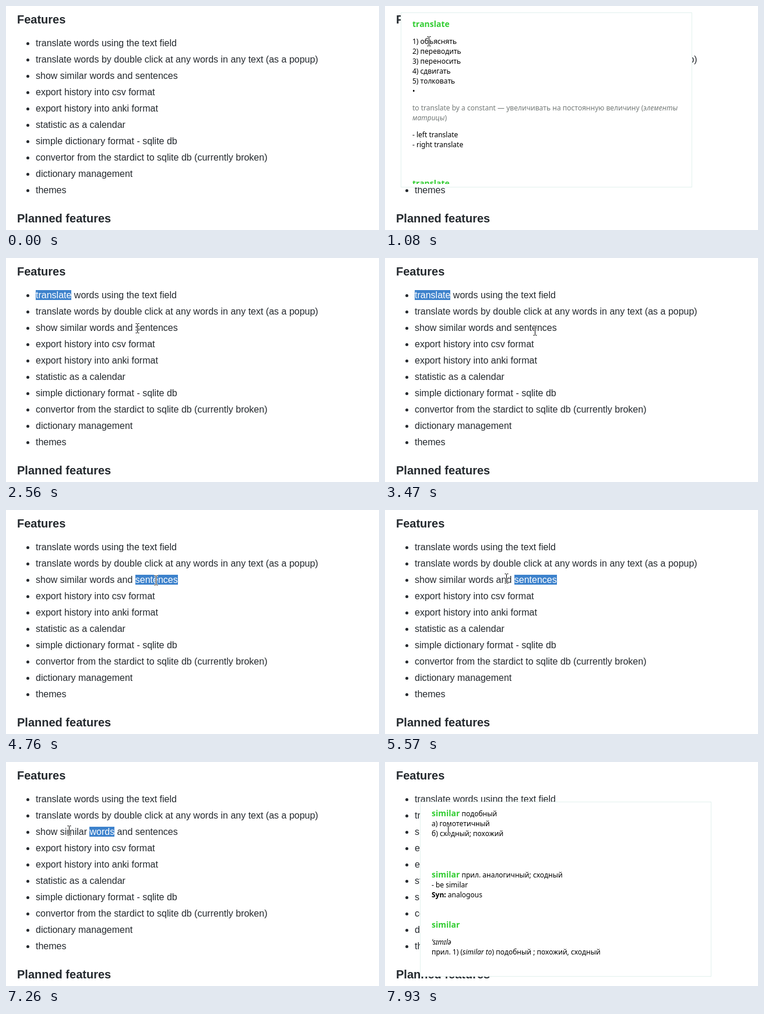
Recreate the animation shown at these times as an HTML page. Size 640 px wide and 384 px high, loop 8 s.

```html
<!DOCTYPE html>
<html lang="en">
<head>
<meta charset="utf-8">
<title>Features</title>
<style>
  html, body { margin: 0; width: 100%; height: 100%; overflow: hidden; background: #fff; }
  #stage { position: relative; width: 640px; height: 384px; overflow: hidden;
    font: 16px/24px "Liberation Sans", Arial, sans-serif; color: #24292e; white-space: nowrap; }
  h3 { position: absolute; left: 19px; margin: 0; font-size: 20px; line-height: 25px; }
  ul { position: absolute; left: 51px; top: 52px; margin: 0; padding: 0; list-style: none; }
  li { position: relative; height: 28px; }
  li::before { content: ""; position: absolute; left: -16px; top: 10px;
    width: 5px; height: 5px; border-radius: 50%; background: #24292e; }
  .selected { background: #3d82cc; color: #fff; }
  .popup { position: absolute; box-sizing: border-box; width: 500px; height: 300px;
    background: #fff; border: 1px solid #e2f1ee; color: #000;
    font: 12px "Noto Sans", sans-serif; line-height: normal; }
  .content { position: absolute; left: 19px; top: 9px; width: 470px; height: 284px; overflow: hidden; }
  .popup p { margin: 0 0 12px; }
  .popup .term { font-size: 14px; color: #32cd32; }
  .popup .example { color: #747a78; }
  #cursor { position: absolute; left: 0; top: 0; overflow: visible; }
</style>
</head>
<body>
<div id="stage">
  <h3 style="top:11px">Features</h3>
  <ul>
    <li><span id="translate">translate</span> words using the text field</li>
    <li>translate words by double click at any words in any text (as a popup)</li>
    <li>show <span id="similar">similar</span> <span id="words">words</span> and <span id="sentences">sentences</span></li>
    <li>export history into csv format</li>
    <li>export history into anki format</li>
    <li>statistic as a calendar</li>
    <li>simple dictionary format - sqlite db</li>
    <li>convertor from the stardict to sqlite db (currently broken)</li>
    <li>dictionary management</li>
    <li>themes</li>
  </ul>
  <h3 style="top:352px">Planned features</h3>

  <div class="popup" id="translatePopup" style="left:27px;top:11px"><div class="content">
    <p><b class="term">translate</b></p>
    <p>1) объяснять<br>2) переводить<br>3) переносить<br>4) сдвигать<br>5) толковать<br>•</p>
    <p class="example">to translate by a constant — увеличивать на постоянную величину (<i>элементы<br>матрицы</i>)</p>
    <p style="margin-bottom:48px">- left translate<br>- right translate</p>
    <p><b class="term">translate</b></p>
  </div></div>

  <div class="popup" id="similarPopup" style="left:60px;top:68px"><div class="content">
    <p style="margin-bottom:52px"><b class="term">similar</b> подобный<br>а) гомотетичный<br>б) сходный; похожий</p>
    <p style="margin-bottom:33px"><b class="term">similar</b> прил. аналогичный; сходный<br>- be similar<br><b>Syn:</b> analogous</p>
    <p><b class="term">similar</b></p>
    <p><i>ˈsɪmɪlə</i><br>прил. 1) (<i>similar to</i>) подобный ; похожий, сходный</p>
  </div></div>

  <svg id="cursor" width="1" height="1" fill="none">
    <g id="beam">
      <path id="beamShape" d="M-3-8H-1L0-7L1-8H3M0-7V7M-3 8H-1L0 7L1 8H3" stroke="#fff" stroke-width="3"/>
      <use href="#beamShape"/>
      <path d="M-3-8H-1L0-7L1-8H3M0-7V7M-3 8H-1L0 7L1 8H3" stroke="#000"/>
    </g>
  </svg>
</div>
<script>
  const LOOP = 8000;
  const FADE = 240;
  const byId = id => document.getElementById(id);
  const clamp = v => Math.max(0, Math.min(1, v));

  // Start and end of each highlighted word, in ms
  const selections = {
    translate: [780, 4480],
    sentences: [4620, 5940],
    words: [6130, 7420],
    similar: [7580, LOOP]
  };

  // Popups fade in and vanish at once
  const popups = {
    translatePopup: [840, 2540],
    similarPopup: [7690, LOOP]
  };

  // Pointer path: time, x, y
  const path = [
    [660, 75.5, 60.5], [1760, 75.5, 60.5],
    [2280, 225.5, 122.5], [2520, 225.5, 122.5], [2560, 225.5, 120.5],
    [3190, 225.5, 120.5], [3340, 243.5, 125.5], [3470, 257.5, 124.5],
    [4210, 257.5, 124.5], [4420, 257.5, 120.5],
    [5210, 257.5, 120.5], [5900, 165.5, 114.5],
    [6030, 165.5, 113.5], [6150, 170.5, 116],
    [6900, 170.5, 116], [7080, 138.5, 125.5], [7250, 108.5, 117.5]
  ];

  function pointerAt(t) {
    const next = path.findIndex(p => p[0] > t);
    if (next < 0) return path[path.length - 1].slice(1);
    const [t0, x0, y0] = path[next - 1];
    const [t1, x1, y1] = path[next];
    const u = (t - t0) / (t1 - t0);
    const k = u * u * (3 - 2 * u);
    return [x0 + (x1 - x0) * k, y0 + (y1 - y0) * k];
  }

  function draw(now) {
    const t = now % LOOP;
    for (const [id, [from, to]] of Object.entries(selections))
      byId(id).classList.toggle("selected", t >= from && t < to);
    for (const [id, [from, to]] of Object.entries(popups))
      byId(id).style.opacity = t < to ? clamp((t - from) / FADE) : 0;

    const visible = t >= path[0][0];
    byId("cursor").style.display = visible ? "" : "none";
    if (visible) {
      const [x, y] = pointerAt(t).map(v => Math.floor(v) + 0.5);
      byId("beam").setAttribute("transform", `translate(${x} ${y})`);
    }
    requestAnimationFrame(() => draw(performance.now()));
  }
  draw(performance.now());
</script>
</body>
</html>
```
